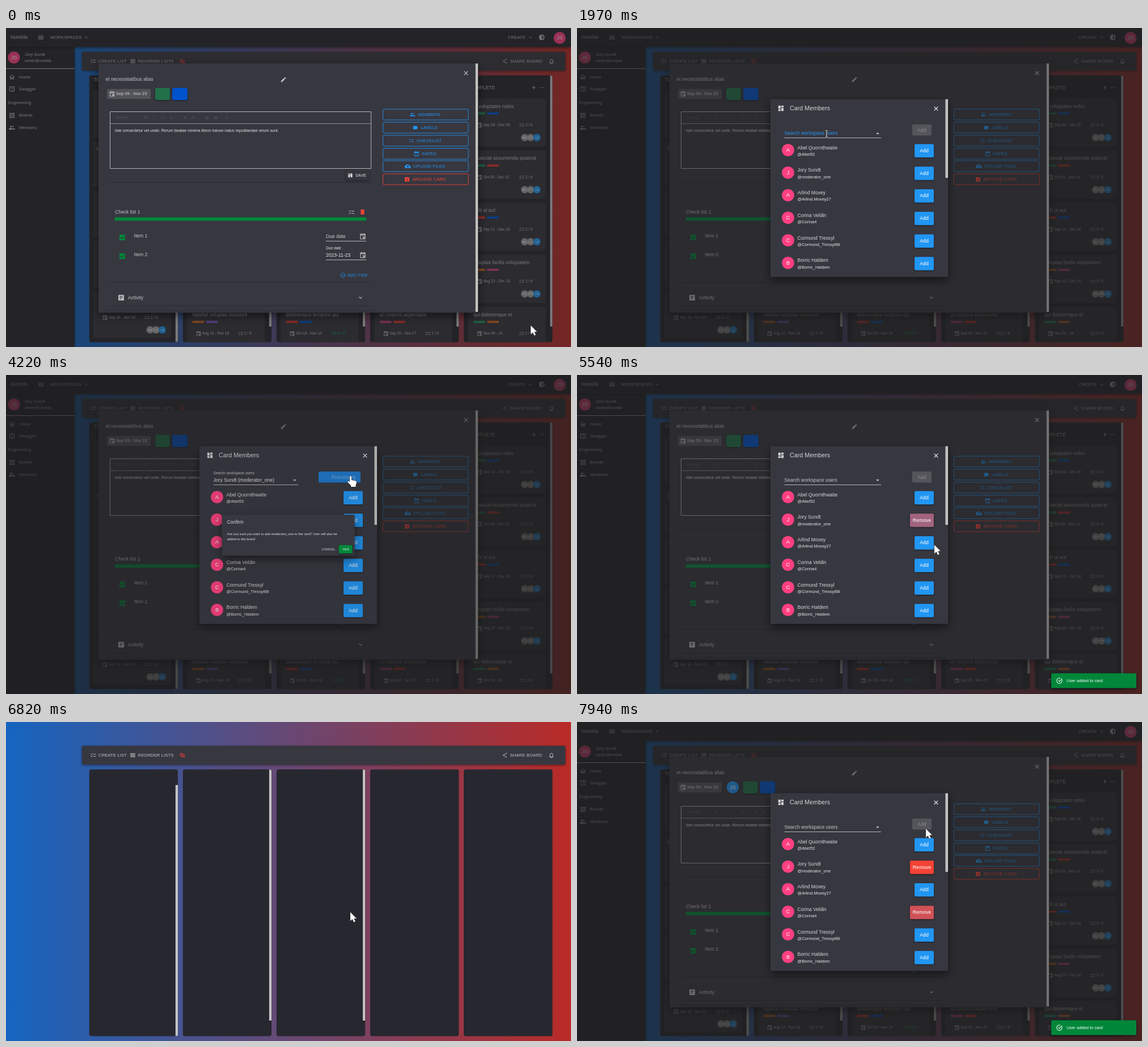
An HTML page with a canvas that plays this animation: 996x562 px, repeating every 7.99 s.

```html
<!DOCTYPE html>
<html lang="en">
<head>
<meta charset="utf-8">
<title>Card members</title>
<style>
html, body { margin: 0; width: 100%; height: 100%; overflow: hidden; background: #27272f; }
canvas { display: block; width: 100vw; height: 100vh; }
</style>
</head>
<body>
<canvas id="stage" width="996" height="562"></canvas>
<script>
const LOOP = 7990;
const c = document.getElementById('stage').getContext('2d');
const FONT = '"Liberation Sans", Arial, sans-serif';
const SOFT = 'rgba(255,255,255,.7)', WHITE = '#fff', DIM = 'rgba(255,255,255,.45)';
const BLUE = '#2196f3', PINK = '#ff4081', RED = '#f44336', GREEN = '#00873a';
const SURFACE = '#373740', DARK = '#27272f', BAR = '#c4c4c2';

// Icons on a 24 unit grid: lines unless listed in SOLID
const ICONS = {
  close: 'M6 6L18 18M18 6L6 18',
  menu: 'M3 7H21M3 12H21M3 17H21',
  rows: 'M3 6H21M3 10H21M3 14H21M3 18H21',
  down: 'M7 9.5L12 14.5L17 9.5',
  tasks: 'M13 8H22M13 16H22M3 7L6 10L11 5M3 15L6 18L11 13',
  cal: 'M4 5H20V21H4ZM4 8H20M8 2V5M16 2V5M13 14H17V18H13Z',
  home: 'M3 12L12 4L21 12M6 10V19H10V13H14V19H18V10',
  help: 'M4 3H20V18H14L12 21L10 18H4ZM9 8Q12 4 15 8Q15 10 12 12M12 14V16',
  board: 'M4 4H10V12H4ZM14 4H20V8H14ZM4 16H10V20H4ZM14 12H20V20H14Z',
  bell: 'M5 18H19M7 18V11Q7 6 12 5Q17 6 17 11V18M10 21H14',
  share: 'M18 5L6 12L18 19M17 5H19M17 19H19M5 12H7',
  eye: 'M2 12Q12 1 22 12Q12 23 2 12M3 3L21 21M9 12A3 3 0 0 0 15 12',
  done: 'M20 9A9 9 0 1 1 15 4M8 11L12 15L21 5',
  plus: 'M12 5V19M5 12H19',
  dots: 'M5 12H7M11 12H13M17 12H19',
  dash: 'M3 3H11V13H3ZM13 3H21V9H13ZM3 15H11V21H3ZM13 11H21V21H13Z',
  people: 'M5 8A3 3 0 1 0 11 8A3 3 0 1 0 5 8M1 19V16Q8 10 15 16V19ZM14 5A3 3 0 1 1 14 11M16 13Q23 14 23 19H17Z',
  tag: 'M3 5H17L22 12L17 19H3Z',
  cloud: 'M6 20A6 6 0 0 1 5 8A8 8 0 0 1 19 10A5 5 0 0 1 19 20ZM10 17H14V13H17L12 8L7 13H10Z',
  pen: 'M3 21V17L14 6L18 10L7 21ZM15 5L18 2L22 6L19 9Z',
  save: 'M3 3H17L21 7V21H3ZM5 5V9H15V5ZM9 16A3 3 0 1 0 15 16A3 3 0 1 0 9 16',
  doc: 'M3 3H21V21H3ZM7 7V9H17V7ZM7 11V13H17V11ZM7 15V17H14V15Z',
  box: 'M3 4H21V21H3ZM11 9V13H8L12 17L16 13H13V9Z',
  date: 'M3 4H21V22H3ZM5 9V20H19V9ZM6 1H8V4H6ZM16 1H18V4H16ZM9 14L11 17L16 12L11 15Z',
  moon: 'M12 1L15 4H20V9L23 12L20 15V20H15L12 23L9 20H4V15L1 12L4 9V4H9ZM12 6V18A6 6 0 0 0 12 6'
};
const SOLID = 'dash people tag cloud pen save doc box date moon'.split(' ');

const clamp = v => Math.max(0, Math.min(1, v));
const ramp = (t, from, dur) => clamp((t - from) / dur);
const ease = p => p * p * (3 - 2 * p);
const within = (t, spans) => spans.some(([a, b]) => t >= a && t < b);

function text(s, x, y, size = 8.6, color = SOFT, align = 'left', gap = 0) {
  c.font = size + 'px ' + FONT;
  c.letterSpacing = gap + 'px';
  c.textAlign = align;
  c.textBaseline = 'middle';
  c.fillStyle = color;
  c.fillText(s, x, y + .3);
}
const caps = (s, x, y, color = SOFT, size = 7.53, align) => text(s, x, y, size, color, align, .2);

function box(x, y, x2, y2, fill, r = 0) {
  c.fillStyle = fill;
  c.beginPath();
  c.roundRect(x, y, x2 - x, y2 - y, r);
  c.fill();
}
function frame(x, y, x2, y2, color, r = 0) {
  c.strokeStyle = color;
  c.lineWidth = 1;
  c.beginPath();
  c.roundRect(x, y, x2 - x, y2 - y, r);
  c.stroke();
}
const line = (x, x2, y, color) => box(x, y - .5, x2, y + .5, color);

function icon(name, x, y, size = 11.5, color = SOFT, weight = 2) {
  c.save();
  c.translate(x, y);
  c.scale(size / 24, size / 24);
  c.translate(-12, -12);
  const p = new Path2D(ICONS[name]);
  c.fillStyle = c.strokeStyle = color;
  c.lineWidth = weight;
  if (SOLID.includes(name)) c.fill(p, 'evenodd'); else c.stroke(p);
  c.restore();
}
function avatar(x, y, r, s, size, fill = PINK) {
  c.fillStyle = fill;
  c.beginPath();
  c.arc(x, y, r, 0, 7);
  c.fill();
  text(s, x, y, size, WHITE, 'center');
}
function raised(draw, blur = 12, dy = 5) {
  c.save();
  c.shadowColor = 'rgba(0,0,0,.5)';
  c.shadowBlur = blur;
  c.shadowOffsetY = dy;
  draw();
  c.restore();
}
function shade(alpha) {
  if (alpha > 0) box(0, 0, 996, 562, `rgba(33,33,33,${alpha})`);
}
function pop(p, draw) {
  if (p <= 0) return;
  c.save();
  c.globalAlpha = Math.min(1, p * 2.5);
  c.translate(497.5, 282);
  c.scale(.5 + p / 2, .5 + p / 2);
  c.translate(-497.5, -282);
  draw();
  c.restore();
}

// Board
const CHIPS = { g: '#1f8a5b', b: '#0052cc', r: '#d9322b', o: '#c8641e', p: '#7a55c4', k: '#c2407a' };
const COLUMNS = [
  { name: 'TO DO', top: 110, step: 88.2, last: ['quia voluptatem sit', 'gb', 'Sep 16 - Nov 19', '2 / 6'] },
  { name: 'IN PROGRESS', last: ['repellat voluptas nesciunt', 'op', 'Aug 14 - Nov 18', '2 / 6'] },
  { name: 'REVIEW', last: ['doloremque tempore qui', 'rb', 'Oct 18 - Nov 14', '6 / 6'] },
  { name: 'TESTING', last: ['ut corporis aspernatur', 'kr', 'Sep 20 - Nov 27', '2 / 6'] },
  { name: 'COMPLETE', last: ['qui doloremque et', 'go', 'Nov 09 - 16', '1 / 6'] }
];
const CARDS = [
  ['et voluptates nobis', 'gb', 'Sep 08 - Dec 05', '3 / 6', 'AM', 'CV'],
  ['occaecati assumenda quaerat', 'gr', 'Oct 05 - Dec 10', '3 / 6', 'BH', 'CT'],
  ['velit ut aut', 'rb', 'Sep 21 - Dec 03', '3 / 6', 'BH', 'CV'],
  ['voluptas facilis voluptatem', 'ok', 'Aug 23 - Dec 10', '3 / 6', 'AQ', 'AM']
];

function card(x, y, [title, chips, date, count, a = 'AM', b = 'CV'], h) {
  box(x + 7.5, y, x + 144.5, y + h, '#34343d', 3);
  const end = x + 140;
  c.save();
  c.beginPath();
  c.rect(x, y, 150, h);
  c.clip();
  const tx = title.startsWith('occ') ? x + 13 : title.startsWith('vol') ? x + 16 : x + 16.5;
  text(title, tx, y + 14);
  [...chips].forEach((k, i) => box(x + 16.5 + i * 24.5, y + 24.5, x + 38 + i * 24.5, y + 28.5, CHIPS[k], 2));
  icon('cal', x + 28, y + 47, 10);
  text(date, x + 34.5, y + 47, 6.5);
  const full = count === '6 / 6' ? '#00b855' : SOFT;
  icon('tasks', x + 102, y + 47, 10.5, full);
  text(count, x + 108.5, y + 47, 6.5, full);
  avatar(end - 32.5, y + 69, 6.5, a, 6, '#9a9a9a');
  avatar(end - 22, y + 69, 6.5, b, 6, '#9a9a9a');
  avatar(end - 11, y + 69, 6.5, '+1', 6, BLUE);
  c.restore();
}

function board(ready) {
  const left = ready ? 121 : 0;
  const g = c.createLinearGradient(left, 0, 996, 0);
  g.addColorStop(0, '#1565c0');
  g.addColorStop(1, '#b92b27');
  c.fillStyle = g;
  c.fillRect(0, 0, 996, 562);
  raised(() => box(134, 42, 986, 75, SURFACE, 2), 4, 1);
  icon('tasks', 153.5, 58.5);
  caps('CREATE LIST', 163, 58.5);
  icon('rows', 223.5, 58.5);
  caps('REORDER LISTS', 232.5, 58.5);
  icon('eye', 311, 58.5, 12, RED);
  icon('share', 879.5, 58.5, 12);
  caps('SHARE BOARD', 888.5, 58.5);
  icon('bell', 961.5, 58.5, 12);

  COLUMNS.forEach(({ name, top = 124, step = 91.8, last }, i) => {
    const x = 146.5 + i * 165.1;
    c.save();
    c.beginPath();
    c.roundRect(x, 83.5, 156.5, 470, 4);
    c.clip();
    box(x, 83, x + 157, 554, DARK);
    if (ready) {
      text(name, x + 8, top - 19);
      icon('plus', x + 123.5, top - 19, 11);
      icon('dots', x + 137.5, top - 19, 12, SOFT, 3);
      for (let k = 0; k < 5; k++) card(x, top + k * step, k < 4 ? CARDS[k] : last, i ? 85 : 83);
    }
    if (ready || i < 3) {
      const y = i ? 83.5 : 111;
      box(x + 152.3, y, x + 156.5, y + 442.5, BAR);
    }
    c.restore();
  });
  if (!ready) return;

  raised(() => box(0, 33, 121, 562, DARK), 5, 0);
  raised(() => box(0, 0, 996, 33.5, DARK), 5, 1);
  text('Nurelda', 8, 16.5);
  icon('menu', 61.5, 16.5, 12.5);
  caps('WORKSPACES', 78, 16.5);
  icon('down', 141.5, 16.5);
  caps('CREATE', 884.5, 16.5);
  icon('down', 924.5, 16.5);
  icon('moon', 944.5, 16.5, 12);
  avatar(976, 17.5, 10.6, 'JS', 9.5);
  avatar(14, 52, 10.6, 'JS', 9.5);
  text('Jory Sundt', 33, 47, 7.53);
  text('owner@nurelda', 33, 58, 6.6);
  line(0, 121, 71.5, BAR);
  [['home', 'Home', 86.5], ['help', 'Swagger', 108], ['board', 'Boards', 154], ['people', 'Members', 175.5]]
    .forEach(([name, label, y]) => {
      icon(name, 10.5, y, 12);
      text(label, 23, y, 7.53);
    });
  text('Engineering', 4, 132, 7.53);
}

// Card window
const ACTIONS = [['people', 'MEMBERS'], ['tag', 'LABELS'], ['tasks', 'CHECKLIST'],
  ['date', 'DATES'], ['cloud', 'UPLOAD FILES'], ['box', 'ARCHIVE CARD']];

function cardWindow(joined, hover) {
  const dy = joined ? 1 : 0, rule = '#2b2b33';
  raised(() => box(163, 62.5 - dy, 832, 501.5 + dy, SURFACE, 2), 16, 6);
  box(827.7, 62.5 - dy, 832, 500 + dy, BAR);
  c.save();
  c.translate(0, -dy);
  icon('close', 811, 79.5, 13.5);
  text('et necessitatibus alias', 175.5, 90.5);
  icon('pen', 489, 91, 11);
  box(178, 107.5, 255, 125, '#525259', 2);
  icon('cal', 187, 116, 11);
  text('Sep 09 - Nov 23', 194, 116, 7.53, '#d5d5d8');
  const lx = joined ? 29.5 : 0;
  if (joined) avatar(274.5, 116, 10.6, 'JS', 9.5, BLUE);
  raised(() => {
    box(263 + lx, 105.5, 289 + lx, 127, '#217049', 4);
    box(293 + lx, 105.5, 320 + lx, 127, '#0052cc', 4);
  }, 3, 1);
  c.translate(0, dy * 2);

  frame(183.5, 147.5, 643.5, 247.5, '#b4b4b8');
  line(184, 643, 168.5, '#8e8e94');
  const faint = '#53535c';
  text('Normal', 193, 158, 7, faint);
  [...'BIUS'].forEach((k, i) => text(k, 244 + i * 15, 158, 7.5, faint));
  text('A', 313, 158, 7.5, faint);
  text('A', 327, 158, 7.5, faint);
  ['rows', 'rows', 'share'].forEach((k, i) => icon(k, 354 + i * 19 - (i ? 3 : 0), 158, 8, faint));
  text('Iste consectetur vel unde. Rerum beatae minima libero harum natus repudiandae rerum sunt.',
    192, 180.5, 7, '#e4e4e6');
  raised(() => box(597, 250, 641, 268.5, '#35353e', 2), 3, 1);
  icon('save', 607, 259.5, 9.5, '#e4e4e6');
  caps('SAVE', 616, 259.5, '#e4e4e6', 7);
  line(183, 644, 272, rule);

  text('Check list 1', 192, 324.5);
  icon('tasks', 609, 324.5, 12);
  box(625.5, 321, 631.5, 328.5, RED, 1);
  box(625, 319.8, 632, 321, RED);
  box(192, 333.5, 635, 339.5, GREEN);
  [369, 402].forEach((y, i) => {
    box(200, y - 5, 210, y + 5, GREEN, 1);
    c.strokeStyle = SURFACE;
    c.lineWidth = 1.2;
    c.beginPath();
    c.moveTo(202, y);
    c.lineTo(204.2, y + 2.3);
    c.lineTo(208.3, y - 2.2);
    c.stroke();
    text('Item ' + (i + 1), 225.5, y - 2.5);
    icon('cal', 629, y - 2, 12.5);
    line(564, 635, y + 6.5, '#b4b4b8');
  });
  text('Due date', 564, 367);
  text('Due date', 564, 387.5, 6.6, '#e4e4e6');
  text('2023-11-23', 564, 400, 8.6, '#e4e4e6');
  icon('done', 594, 435.5, 10.5, BLUE);
  caps('ADD ITEM', 602, 435.5, BLUE, 7);
  line(183, 642, 448, rule);
  icon('doc', 203, 475, 13);
  text('Activity', 215, 475);
  icon('down', 625, 475, 13);
  line(183, 642, 489.5, rule);
  line(175, 652, 498, rule);

  [152.5, 175.5, 198.5, 221.5, 243.5, 266.5].forEach((y, i) => {
    const [name, label] = ACTIONS[i], color = i === 5 ? RED : BLUE;
    if (hover && !i) box(664.5, y - 9.5, 815, y + 9.5, 'rgba(33,150,243,.06)', 2);
    c.globalAlpha *= .85;
    frame(664.5, y - 9.5, 815, y + 9.5, color, 2);
    c.globalAlpha /= .85;
    c.font = '7.53px ' + FONT;
    c.letterSpacing = '.2px';
    const w = c.measureText(label).width, x = 746 - w / 2;
    caps(label, x, y, color);
    icon(name, x - 9.5, y, 10.5, color);
  });
  c.restore();
}

// Members dialog
const PEOPLE = [['Abel Quornthwaite', '@Abel52'], ['Jory Sundt', '@moderator_one'],
  ['Arlind Moxey', '@Arlind.Moxey27'], ['Corina Veldin', '@Corina4'],
  ['Cormund Tressyl', '@Cormund_Tressyl68'], ['Borric Haldem', '@Borric_Haldem']];
const ADDED = { 1: 5400, 3: 7750 };
const mix = (a, b, p) => 'rgb(' + a.map((v, i) => Math.round(v + (b[i] - v) * p)) + ')';

function loading(t) {
  raised(() => box(342.5, 138, 653, 426, SURFACE, 2), 16, 6);
  text('Add card member', 354, 155, 10.75, '#d5d5d8');
  icon('close', 635.5, 155, 13);
  const s = (t - 1040) / 400;
  if (s < 0) return;
  c.strokeStyle = PINK;
  c.lineWidth = 2;
  c.beginPath();
  c.arc(497.5, 300, 9.7, s * s * 3, s * s * 3 + .15 + ease(clamp(s)) * 4);
  c.stroke();
}

function search(t) {
  const focus = t >= 1970 && t < 3240, picked = t >= 3240 && t < 5400, busy = t >= 4010 && t < 5400;
  const up = t < 5400 ? ease(ramp(t, 1970, 150)) : 1 - ease(ramp(t, 5400, 160));
  const end = busy ? 515 : 536;
  text('Search workspace users', 365.5, 185.5 - 12.5 * up, 8.6 - 2 * up, focus ? BLUE : SOFT);
  line(365.5, end, 193.5, '#b4b4b8');
  if (focus) {
    const w = 85 * ease(ramp(t, 1970, 150));
    box(450.5 - w, 192.5, 450.5 + w, 194, BLUE);
  }
  const ax = end - 6, d = focus ? -1 : 1;
  c.fillStyle = '#d0d0d2';
  c.beginPath();
  c.moveTo(ax - 2.8, 185.5 - d * 1.3);
  c.lineTo(ax + 2.8, 185.5 - d * 1.3);
  c.lineTo(ax, 185.5 + d * 1.5);
  c.fill();
  if (focus && t >= 2330) text('Jory', 365.5, 185.5, 8.6, '#e4e4e6');
  if (picked) text('Jory Sundt (moderator_one)', 365.5, 185.5, 8.6, '#e4e4e6');
  if (busy) {
    box(551, 170, 625, 189.5, '#1e78cc', 2);
    text('Processing', 574, 180, 8.6, 'rgba(255,255,255,.4)');
  } else if (picked) {
    raised(() => box(591, 170, 625, 189.5, BLUE, 2), 3, 1);
    text('Add', 608, 180, 8.6, WHITE, 'center');
  } else {
    box(591, 170, 625, 189.5, '#54545b', 2);
    text('Add', 608, 180, 8.6, '#8b8b90', 'center');
  }
}

function members(t) {
  raised(() => box(341, 125.5, 654, 438.5, SURFACE, 2), 16, 6);
  box(649.5, 125.5, 654, 264, BAR);
  icon('dash', 359.5, 141.5, 12.5, '#d0d0d2');
  text('Card Members', 375, 142, 10.75, '#d5d5d8');
  icon('close', 633, 142, 13, '#e4e4e6');
  search(t);
  PEOPLE.forEach(([name, user], i) => {
    const y = 215.5 + i * 39.75, p = i in ADDED ? ramp(t, ADDED[i], 230) : 0;
    avatar(372, y - .5, 10.8, name[0], 9.3);
    text(name, 388.5, y - 4.5, 8.6, '#d5d5d8');
    text(user, 388.5, y + 7, 7.53, '#e4e4e6');
    const x = p > 0 ? 587 : 595;
    raised(() => box(x, y - 11, 629, y + 12.5, mix([33, 150, 243], [244, 67, 54], p), 2), 3, 1);
    text(p > 0 ? 'Remove' : 'Add', (x + 629) / 2, y + .7, 8.7, WHITE, 'center');
  });
  if (t >= 2680 && t < 3260) {
    raised(() => box(365.5, 198, 536, 254, '#33333c', 2), 8, 3);
    box(372, 204, 529.5, 245.5, t > 3000 ? '#2f2f37' : '#34343d');
    avatar(393, 223, 10.8, 'JS', 9.3);
    text('Jory Sundt', 409.5, 219, 8.6, '#d5d5d8');
    text('@moderator_one', 409.5, 230.5, 7.53, '#e4e4e6');
  }
}

function confirmBox(who) {
  raised(() => box(347, 236, 648, 328.5, SURFACE, 2), 16, 6);
  text('Confirm', 359, 253, 10.6, '#d5d5d8');
  text(`Are you sure you want to add ${who} to the card? User will also be`, 359, 279, 7.53, '#e4e4e6');
  text('added to the board', 359, 291, 7.53, '#e4e4e6');
  caps('CANCEL', 573.5, 314, '#e4e4e6', 7.3);
  raised(() => box(612, 304.5, 643, 323.5, GREEN, 2), 3, 1);
  caps('YES', 628, 314, WHITE, 7.3, 'center');
}

function snack(p) {
  if (p <= 0) return;
  c.save();
  c.globalAlpha = p;
  c.translate(0, 20 * (1 - ease(p)));
  raised(() => box(836, 525.5, 986, 551.5, GREEN, 2), 6, 2);
  icon('done', 850.5, 538.5, 12.5, WHITE);
  text('User added to card', 863, 538.5, 7.53, WHITE);
  c.restore();
}

// Pointer
const PATH = [[30, 925, 524], [810, 752, 154], [1200, 752, 154], [1950, 440, 186], [2800, 440, 186],
  [3120, 451, 216], [3260, 451, 216], [3620, 606, 178], [4440, 606, 178], [5150, 627, 311],
  [5300, 627, 311], [5530, 630, 299], [5800, 611, 333], [5960, 611, 333], [6350, 627, 311],
  [6560, 627, 311], [6780, 607, 335], [6950, 607, 335], [7650, 615, 188]];
const HAND = [[760, 1270], [2960, 3330], [3570, 4570], [5060, 5360], [5720, 6060], [6250, 6620]];

function pointer(t) {
  let i = PATH.findIndex(k => k[0] > t);
  if (i < 0) i = PATH.length - 1;
  const b = PATH[i], a = PATH[Math.max(0, i - 1)];
  const p = ease(ramp(t, a[0], b[0] - a[0] || 1));
  c.save();
  c.translate(a[1] + (b[1] - a[1]) * p, a[2] + (b[2] - a[2]) * p);
  c.lineJoin = 'round';
  c.lineWidth = 1;
  c.strokeStyle = '#222';
  c.fillStyle = WHITE;
  let d = 'M0 0V15.5L3.6 12.2L6.2 17.8L8.8 16.6L6.3 11.2H11Z';
  if (within(t, HAND)) d = 'M0 1.5Q1.5 -1 3 1.5V7L10 8.5Q12.5 9.5 12 12L10.5 16V19H2V16.5L-3.5 11Q-4 8.5 -1.5 9L0 10.5Z';
  if (within(t, [[1870, 2830]])) d = 'M-2.5 -6H2.5V-5.4H.5V5.4H2.5V6H-2.5V5.4H-.5V-5.4H-2.5Z';
  const shape = new Path2D(d);
  c.stroke(shape);
  c.fill(shape);
  c.restore();
}

function draw(t) {
  const reload = 6690, back = 6860, reopen = 6930, again = 7180;
  const before = t < reload;
  c.globalAlpha = 1;
  board(before || t >= back);
  shade(.45 * (before ? 1 : ramp(t, reopen, 350)));
  pop(before ? 1 : ramp(t, reopen, 200), () => cardWindow(!before, t > 790 && t < 1250));
  const start = before ? 910 : again;
  shade(.5 * ramp(t, start, 400));
  pop(ramp(t, start, 200), () => t < 1500 ? loading(t) : members(t));
  if (before) {
    [[4110, 5260, 'moderator_one'], [5960, 6560, 'Corina4']].forEach(([open, shut, who]) => {
      shade(.5 * ramp(t, open, 400) * (1 - ramp(t, shut, 200)));
      if (t < shut + 40) pop(ramp(t, open, 200), () => confirmBox(who));
    });
  }
  snack(before ? ramp(t, 5340, 150) : ramp(t, 7420, 150));
  pointer(t);
}

function tick() {
  draw(performance.now() % LOOP);
  requestAnimationFrame(tick);
}
tick();
</script>
</body>
</html>
```
